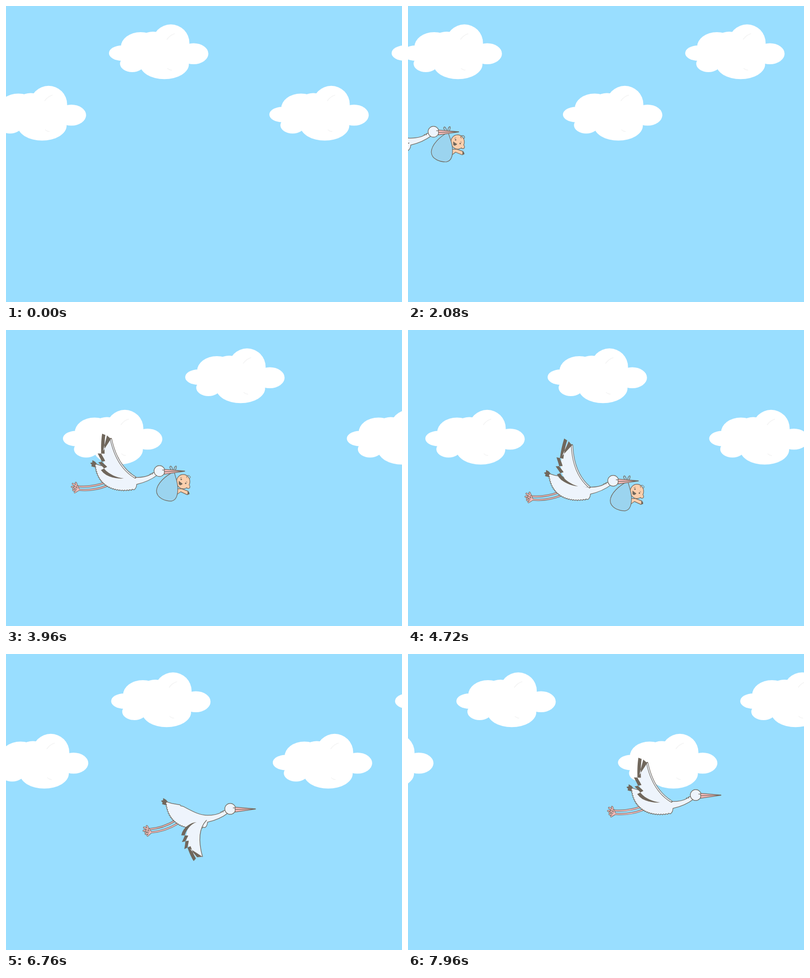
Recreate the animation shown at these times as an HTML page. Size 800 px wide and 600 px high, loop 8 s.

```html
<!DOCTYPE html>
<html lang="en">
<head>
<meta charset="utf-8">
<title>Stork delivery</title>
<style>
html, body { margin: 0; width: 100%; height: 100%; overflow: hidden; background: #99deff; }
svg { display: block; width: 100vw; height: 100vh; }
.ink { stroke: #70675c; stroke-width: 1.2; stroke-linejoin: round; stroke-linecap: round; }
.line { fill: none; }
.white { fill: #eef4fc; }
.pink { fill: #f7bcbc; }
.skin { fill: #fbcfad; }
.cloth { fill: #9bd4ef; }
.dark { fill: #70675c; }
</style>
</head>
<body>
<svg viewBox="0 0 800 600">
  <defs>
    <g id="cloud" fill="#fff">
      <ellipse cx="26" cy="95.5" rx="26" ry="15.5"/>
      <ellipse cx="64" cy="83" rx="40" ry="30"/>
      <ellipse cx="89" cy="74" rx="30" ry="22"/>
      <ellipse cx="125" cy="75" rx="37.5" ry="37.7"/>
      <ellipse cx="171" cy="96.7" rx="29.8" ry="21.3"/>
      <ellipse cx="47" cy="117" rx="24.7" ry="17"/>
      <ellipse cx="112" cy="118" rx="49.5" ry="30.3"/>
      <ellipse cx="100" cy="95" rx="62" ry="32"/>
      <path d="M117 68Q123 59 133 56M118 126q4 4 9 4" fill="none" stroke="#f4f4f4" stroke-width="1.6"/>
    </g>
    <path id="bone" d="M344 337C326 344 306 347 287 345l-9-5M287 345l-11 1M287 345l-8 5M287 345l-3-7"/>
    <g id="leg" class="ink line">
      <use href="#bone" stroke-width="4"/>
      <use href="#bone" stroke="#f7bcbc" stroke-width="2"/>
    </g>
  </defs>

  <g id="sky"></g>

  <g id="baby">
    <path class="ink skin" d="M489 409L498 409 511 414 513 419 509 421 496 415 489 420z"/>
    <path class="dark" d="M510 414l3 2 .5 4-4 1z"/>
    <circle class="ink skin" cx="511" cy="405" r="3.500"/>
    <ellipse class="ink skin" cx="501" cy="394.500" rx="13.500" ry="14.500"/>
    <circle cx="510.500" cy="404" r="3" class="skin"/>
    <path class="ink line" style="stroke-width:1" d="M509 387c-3-2-1-5 3-5 4 1 5 6 1 6"/>
    <g class="dark">
      <circle cx="497" cy="390" r="1.500"/><circle cx="506" cy="398" r="1.500"/>
      <path d="M492 393Q497 397 500 399 495 404 492 400z"/>
    </g>
    <path class="ink line" style="stroke-width:.8" d="M495 387l3-1M507 394l2 2"/>
    <path class="ink cloth" d="M481 376C474 370 472 363 476 363 479 364 480 370 481 376 482 368 484 362 487 363 488 366 485 372 482 376"/>
    <path class="ink cloth" d="M481 375C465 383 448 398 447 413 447 428 465 434 477 434 489 432 490 418 490 408 490 395 485 385 483 375z"/>
  </g>

  <g id="stork">
    <g id="legs"><use href="#leg"/><use href="#leg" x="3" y="7"/></g>
    <path class="ink dark" d="M323 306L316 304 317 301 314 298 318 297 318 293 323 296 327 301z"/>
    <path id="body" class="ink white"/>
    <g id="wing">
      <path id="vane" class="white"/>
      <path id="rim" class="ink line"/>
      <path id="rimFill" class="line" stroke="#eef4fc"/>
      <path id="feathers" class="dark"/>
    </g>
    <circle class="ink white" cx="453" cy="314" r="11"/>
    <path class="ink line" d="M459 312h4"/>
    <path id="lower" class="ink pink" d="M463 314.500L504 314.500 463 320.500z"/>
    <path id="upper" class="ink pink" d="M463 310.500L504 314 463 315.500z"/>
  </g>
</svg>
<script>
const $ = id => document.getElementById(id);
const LOOP = 8000, STEP = 40;
const DROP = 5, LEAVE = 6.9, FLAP = 0.8, WING_UP = 3.96;

// Front edge: root, bend, front tip. Trailing edge: back, two bends, tip.
const WING = {
  root: { up: [404, 327], down: [405, 337] },
  bend: { up: [367, 305], down: [383, 360] },
  front: { up: [355, 249], down: [397, 411] },
  back: { up: [381, 329], down: [385, 341] },
  bend1: { up: [350, 329], down: [360, 345] },
  bend2: { up: [325, 300], down: [355, 385] },
  tip: { up: [347, 242], down: [386, 412] }
};
const FIRST_LOBE = 0.5, LOBE = 0.13, LOBES = 4;

const mix = (a, b, k) => a + (b - a) * k;
const smooth = k => k * k * (3 - 2 * k);
const clamp = k => Math.max(0, Math.min(1, k));
const put = (id, transform) => $(id).setAttribute('transform', transform);
const draw = (id, d) => $(id).setAttribute('d', d);

// Point at u on a cubic, moved sideways by off.
function onCubic([a, b, c, d], u, off = 0) {
  const v = 1 - u;
  const at = i => v * v * v * a[i] + 3 * v * v * u * b[i] + 3 * v * u * u * c[i] + u * u * u * d[i];
  const slope = i => v * v * (b[i] - a[i]) + 2 * v * u * (c[i] - b[i]) + u * u * (d[i] - c[i]);
  const dx = slope(0), dy = slope(1), len = Math.hypot(dx, dy);
  return [at(0) + dy / len * off, at(1) - dx / len * off];
}

function raggedEdge(cubic, teeth, size) {
  let d = '';
  for (let i = 1; i <= teeth; i++) {
    d += `L${onCubic(cubic, (i - 0.25) / teeth, size)}L${onCubic(cubic, i / teeth)}`;
  }
  return d;
}

// Dark band of overlapping lobes; side is -1 (left of the edge) to 1.
function featherBand(edge, side) {
  const outer = [], inner = [];
  for (let lobe = 0; lobe < LOBES; lobe++) {
    const from = lobe ? FIRST_LOBE + LOBE * (lobe - 1) : 0;
    const to = lobe < LOBES - 1 ? FIRST_LOBE + LOBE * lobe : 1;
    for (let f = 0; f <= 1; f += 0.125) {
      const u = mix(from, to, f), taper = clamp(u * 2.5);
      const bulge = (3.5 - 7 * f ** 1.5) * taper;
      outer.push(onCubic(edge, u, bulge * side));
      inner.unshift(onCubic(edge, u, (bulge - 7 * taper) * side));
    }
  }
  return `M${outer.join('L')}L${inner.join('L')}z`;
}

function drawWing(k) {
  const w = {};
  for (const name in WING) {
    const { up, down } = WING[name];
    w[name] = up.map((v, i) => mix(down[i], v, k));
  }
  const rim = `M${w.root}Q${w.bend} ${w.front}`;
  const edge = [w.back, w.bend1, w.bend2, w.tip];
  draw('vane', `${rim}L${w.tip}C${w.bend2} ${w.bend1} ${w.back}z`);
  draw('rim', rim);
  draw('rimFill', rim);
  $('rim').style.strokeWidth = 1.3 + 2.9 * k;
  $('rimFill').style.strokeWidth = 2 * k;
  draw('feathers', featherBand(edge, 1 - 2 * k) + `M${w.tip}L${w.front}L${onCubic(edge, 0.8)}z`);
}

draw('body', 'M322 299L335 303 352 306 353 308 358 309C375 318 390 327 407 327 418 327 428 325 435 321' +
  'L434 320 439 320 438 318 444 317 449 322C436 332 420 338 407 341Q407 348 402 352' +
  raggedEdge([[402, 352], [358, 361], [325, 343], [322, 299]], 24, -1.8) + 'z');

const clouds = [];
for (const x of [-39, 532, 1105.5]) clouds.push([x, 124.5], [x + 247, 0]);
$('sky').innerHTML = clouds.map(([x, y]) => `<use href="#cloud" x="${x}" y="${y}"/>`).join('');

function cloudShift(t) {
  const slow = Math.min(Math.max(t - DROP - 0.01, 0), 1.89);
  return 105.3 * (t - slow) + 22.3 * slow;
}

function headAt(t) {
  const fly = Math.min(t, DROP), u = Math.max(fly - 1, 0);
  const away = Math.max(t - LEAVE, 0);
  return [161.5 + 137.5 * (fly - 2.88) + 121 * away, 248.5 + 2 * u + 3.59 * u * u - 26.4 * away];
}

function render(t) {
  put('sky', `translate(${-cloudShift(t)} 0)`);

  const [x, y] = headAt(t);
  put('stork', `translate(${x - 453} ${y - 314})`);

  const angle = 2 * Math.PI * (t - WING_UP) / FLAP;
  const lift = (1 + Math.cos(angle)) / 2;
  drawWing(smooth(smooth(lift)));
  put('wing', `rotate(${31 * Math.max(0, -Math.sin(angle))} 404 334)`);
  put('legs', `rotate(${-10.5 * (1 - lift)} 344 341)`);

  const open = clamp(Math.min((t - DROP + 0.08) / 0.16, (6.5 - t) / 0.2));
  put('upper', `rotate(${-12.5 * open} 463 314)`);
  put('lower', `rotate(${13.5 * open} 463 314)`);

  const fall = Math.max(t - DROP, 0);
  const swing = t < WING_UP ? -13 * (1 - Math.cos(2 * Math.PI * (t - WING_UP) / 2.08)) : 0;
  put('baby', `translate(${x - 453} ${y - 373 + 187 * fall * fall}) rotate(${swing} 481 375)`);
  $('baby').style.display = fall > 1.4 ? 'none' : '';
}

const start = performance.now();
function tick() {
  const ms = (performance.now() - start) % LOOP;
  render(Math.floor(ms / STEP) * STEP / 1000);
  requestAnimationFrame(tick);
}
tick();
</script>
</body>
</html>
```
